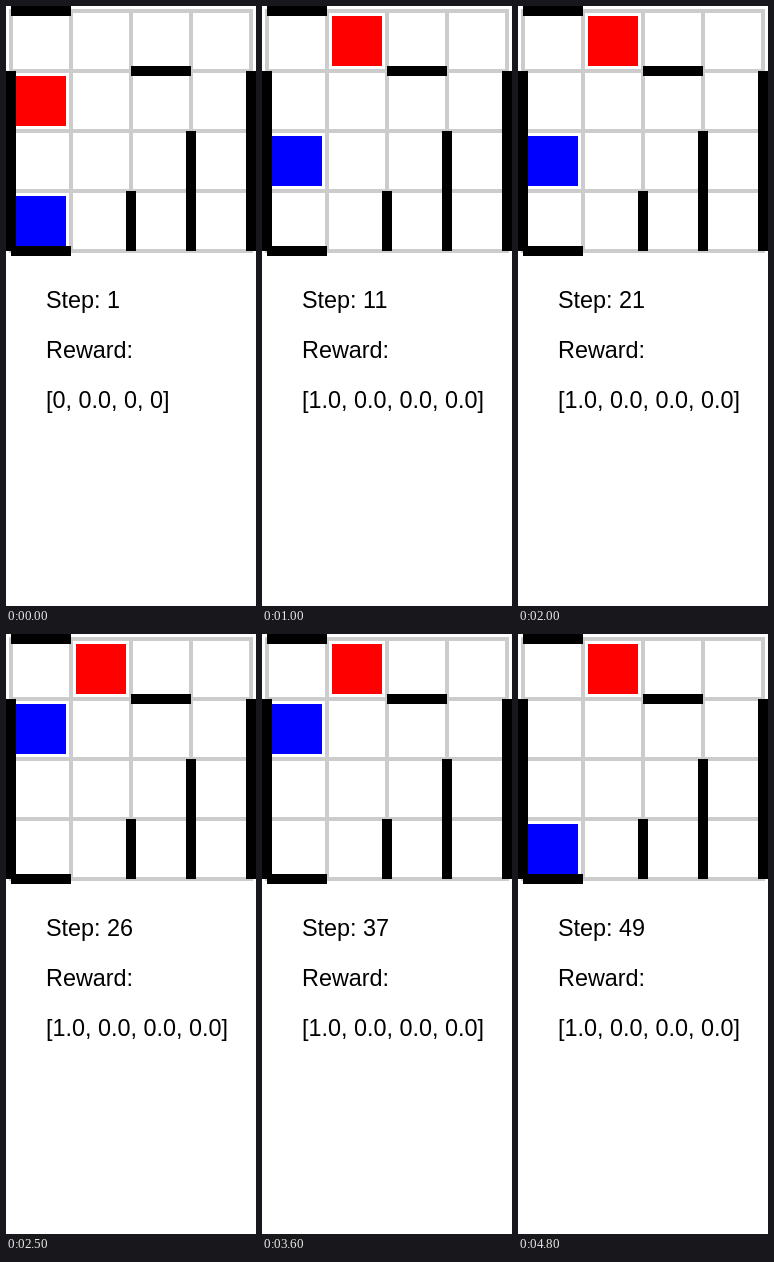
Recreate the animation shown at these times as an HTML page with a canvas. Size 250 px wide and 600 px high, loop 4.9 s.

```html
<!DOCTYPE html>
<html lang="en">
<head>
<meta charset="utf-8">
<title>Grid walk</title>
<style>
  html, body { margin: 0; width: 100%; height: 100%; overflow: hidden; background: #fff; }
  canvas { display: block; }
</style>
</head>
<body>
<canvas id="stage" width="250" height="600"></canvas>
<script>
const ctx = document.getElementById('stage').getContext('2d');
const STEP_MS = 100;
const CELL = 60;
const EDGE = 5;

// One letter per step; '-' is a move blocked by a wall.
const MOVES = '--RUUUDDLUDD--' + '-R-L--UUU--' + 'D--D--U-D-U----U-LR-DD-D';
const DIRS = { U: [0, -1], D: [0, 1], L: [-1, 0], R: [1, 0], '-': [0, 0] };
const GOAL_STEP = 10;

// Walls as grid-point pairs: x1, y1, x2, y2.
const WALLS = [
  [0, 0, 1, 0], [0, 4, 1, 4], [2, 1, 3, 1],
  [0, 1, 0, 4], [2, 3, 2, 4], [3, 2, 3, 4], [4, 1, 4, 4]
];

function walk() {
  let x = 0, y = 3;
  return [...MOVES].map(m => {
    const [dx, dy] = DIRS[m];
    x = (x + dx + 4) % 4;
    y = (y + dy + 4) % 4;
    return [x, y];
  });
}
const path = walk();

function line(x1, y1, x2, y2) {
  ctx.beginPath();
  ctx.moveTo(EDGE + x1 * CELL, EDGE + y1 * CELL);
  ctx.lineTo(EDGE + x2 * CELL, EDGE + y2 * CELL);
  ctx.stroke();
}

function square([x, y], color) {
  ctx.fillStyle = color;
  ctx.fillRect(x * CELL + 10, y * CELL + 10, 50, 50);
}

function rewards(step) {
  const up = step >= GOAL_STEP ? '1.0' : step >= 4 ? '0.0' : '0';
  const left = step >= 9 ? '0.0' : '0';
  const right = step >= 3 ? '0.0' : '0';
  return `[${up}, 0.0, ${left}, ${right}]`;
}

function draw(step) {
  ctx.fillStyle = '#fff';
  ctx.fillRect(0, 0, 250, 600);

  ctx.strokeStyle = '#ccc';
  ctx.lineWidth = 4;
  ctx.lineCap = 'square';
  for (let i = 0; i <= 4; i++) {
    line(i, 0, i, 4);
    line(0, i, 4, i);
  }

  square(step < GOAL_STEP ? [0, 1] : [1, 0], '#f00');
  square(path[step - 1], '#00f');

  ctx.strokeStyle = '#000';
  ctx.lineWidth = 10;
  ctx.lineCap = 'butt';
  WALLS.forEach(w => line(...w));

  ctx.fillStyle = '#000';
  ctx.font = '23.4px "Liberation Sans", Arial, sans-serif';
  ctx.fillText('Step: ' + step, 40, 302);
  ctx.fillText('Reward:', 40, 352);
  ctx.fillText(rewards(step), 40, 402);
}

const start = performance.now();
function tick() {
  const t = performance.now() - start;
  draw(Math.floor(t / STEP_MS) % path.length + 1);
  requestAnimationFrame(tick);
}
tick();
</script>
</body>
</html>
```
